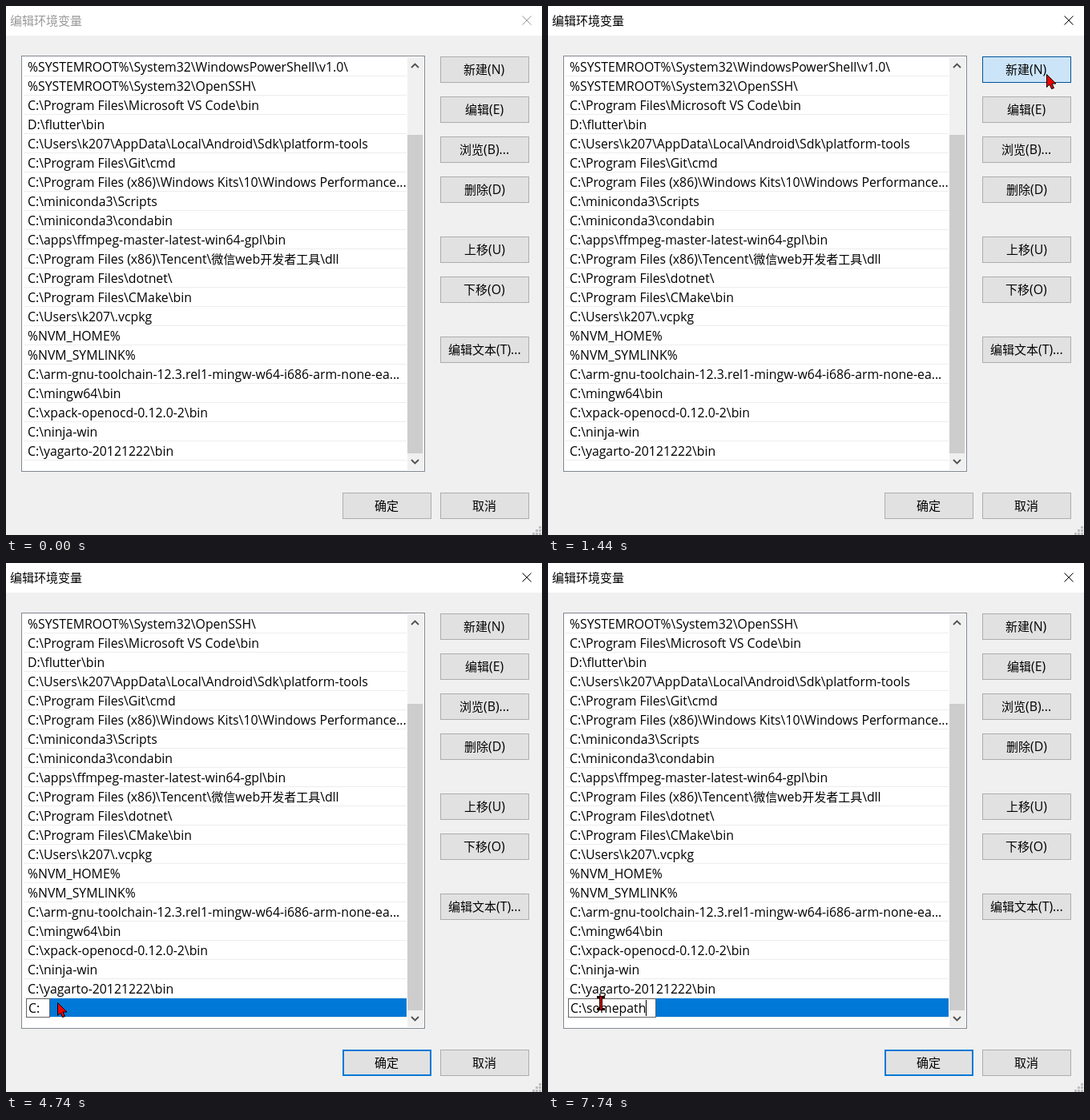
Recreate the animation shown at these times as an HTML page with a canvas. Size 669 px wide and 661 px high, loop 8000 ms.

```html
<!DOCTYPE html>
<html lang="zh">
<head>
<meta charset="utf-8">
<title>编辑环境变量</title>
<style>
html, body { margin: 0; width: 100%; height: 100%; overflow: hidden; background: #f0f0f0; }
canvas { display: block; }
</style>
</head>
<body>
<canvas id="stage" width="669" height="661"></canvas>
<script>
const ctx = document.getElementById('stage').getContext('2d');
const LOOP = 8000, ROW = 24, VISIBLE = 21, BLINK = 480;
const ENTER = 120, PRESS = 1380, ADD = 1620, TYPE = 3360, BURSTS = 6000;

const paths = String.raw`C:\Program Files\Common Files\Oracle\Java\javapath
%SystemRoot%\system32
%SystemRoot%
%SystemRoot%\System32\Wbem
%SYSTEMROOT%\System32\WindowsPowerShell\v1.0\
%SYSTEMROOT%\System32\OpenSSH\
C:\Program Files\Microsoft VS Code\bin
D:\flutter\bin
C:\Users\k207\AppData\Local\Android\Sdk\platform-tools
C:\Program Files\Git\cmd
C:\Program Files (x86)\Windows Kits\10\Windows Performance...
C:\miniconda3\Scripts
C:\miniconda3\condabin
C:\apps\ffmpeg-master-latest-win64-gpl\bin
C:\Program Files (x86)\Tencent\微信web开发者工具\dll
C:\Program Files\dotnet\
C:\Program Files\CMake\bin
C:\Users\k207\.vcpkg
%NVM_HOME%
%NVM_SYMLINK%
C:\arm-gnu-toolchain-12.3.rel1-mingw-w64-i686-arm-none-ea...
C:\mingw64\bin
C:\xpack-openocd-0.12.0-2\bin
C:\ninja-win
C:\yagarto-20121222\bin`.split('\n');

// The side buttons stand 50 apart, with 25 more between groups.
const groups = [['新建(N)', '编辑(E)', '浏览(B)...', '删除(D)'], ['上移(U)', '下移(O)'], ['编辑文本(T)...']];
const buttons = ['确定', '取消'].map((label, i) => ({ label, x: 420 + 122 * i, y: 608 }));
let nextY = 63;
for (const group of groups) {
  for (const label of group) {
    buttons.push({ label, x: 542, y: nextY });
    nextY += 50;
  }
  nextY += 25;
}

// Three slow single keys, then quick pairs.
const typed = 'C:\\somepath';
const keyTimes = [0, 1, 2].map(i => TYPE + 900 * i)
  .concat([6000, 6360, 7320, 7620].flatMap(t => [t, t + 120]));

const moves = [
  { start: ENTER, end: 420, from: [600, 185], to: [390, 228] },
  { start: 1080, end: 1320, from: [390, 228], to: [622, 85] },
  { start: 1740, end: 1980, from: [622, 85], to: [153, 506] },
  { start: 1980, end: 2220, from: [153, 506], to: [64, 549] }
];

const clamp = (v, low, high) => Math.min(high, Math.max(low, v));

function pointerAt(t) {
  const { start, end, from, to } = moves.findLast(m => t >= m.start) || moves[0];
  const k = 1 - (1 - clamp((t - start) / (end - start), 0, 1)) ** 2;
  return from.map((v, i) => Math.round(v + (to[i] - v) * k));
}

// Two wheel notches up, later two down, three rows each.
function topRow(t) {
  const notches = start => clamp(Math.floor((t - start) / 120) + 1, 0, 2);
  const up = Math.max(0, 4 - 3 * notches(480));
  return t >= ADD ? 5 : Math.min(4, up + 3 * notches(960));
}

function rect(x, y, w, h, color) {
  ctx.fillStyle = color;
  ctx.fillRect(x, y, w, h);
}

function frame(x, y, w, h, fill, border, line = 1) {
  rect(x, y, w, h, border);
  rect(x + line, y + line, w - 2 * line, h - 2 * line, fill);
}

function trace(points, color, width) {
  ctx.beginPath();
  points.forEach(([x, y]) => ctx.lineTo(x, y));
  ctx.strokeStyle = color;
  ctx.lineWidth = width;
  ctx.stroke();
}

// Latin and Chinese runs have their own font size; returns the width.
function text(str, x, y, color = '#000', paint = true) {
  let pen = 0;
  ctx.fillStyle = color;
  for (const run of str.match(/[\x00-\xff]+|[^\x00-\xff]+/g) || []) {
    ctx.font = run.charCodeAt(0) < 256
      ? '15.8px "Open Sans", "Noto Sans", sans-serif'
      : '15px "Noto Sans CJK SC", "Noto Sans CJK", sans-serif';
    if (paint) ctx.fillText(run, x + pen, y);
    pen += ctx.measureText(run).width;
  }
  return pen;
}
const widthOf = str => text(str, 0, 0, '#000', false);

function drawTitle(active) {
  const color = active ? '#000' : '#999';
  rect(0, 0, 669, 37, '#fff');
  text('编辑环境变量', 5, 24, color);
  trace([[644.5, 12.5], [655.5, 23.5]], color, 1);
  trace([[655.5, 12.5], [644.5, 23.5]], color, 1);
}

function drawList(t) {
  const top = topRow(t);
  frame(19, 62, 504, 520, '#fff', '#828790');
  ctx.save();
  ctx.beginPath();
  ctx.rect(20, 63, 502, 518);
  ctx.clip();
  for (let i = 0; i <= VISIBLE; i++) {
    rect(22, 87 + i * ROW, 478, 1, '#ededed');
    text(paths[top + i] || '', 27, 82 + i * ROW);
  }
  ctx.restore();
  if (t >= ADD) drawEdit(t);
  drawScrollbar(top, paths.length + (t >= ADD));
}

function drawScrollbar(top, rows) {
  const track = 474;
  rect(501, 64, 20, 516, '#f0f0f0');
  rect(501, Math.round(85 + track * top / rows), 19, Math.round(track * VISIBLE / rows), '#cdcdcd');
  for (const [y, dir] of [[72.5, 1], [571.5, -1]])
    trace([[506, y + 4.5 * dir], [510.5, y], [515, y + 4.5 * dir]], '#505050', 1.8);
}

function drawEdit(t) {
  const count = keyTimes.filter(k => k <= t).length;
  const str = typed.slice(0, count);
  const caret = 28 + Math.round(widthOf(str));
  const right = Math.max(54, caret + 13);
  const idle = t - (count ? keyTimes[count - 1] : ADD);
  rect(25, 544, 475, 23, '#0078d7');
  frame(25, 544, right - 25, 24, '#fff', '#646464');
  text(str, 28, 562);
  if (Math.floor(idle / BLINK) % 2 === 0) rect(caret, 546, 1, 20, '#000');
}

function drawButtons(t) {
  const [px, py] = t >= ENTER ? pointerAt(t) : [0, 0];
  for (const { label, x, y } of buttons) {
    const hover = px >= x && px < x + 111 && py >= y && py < y + 33;
    const pressed = hover && t >= PRESS && t < ADD;
    const isDefault = t >= ADD && label === '确定';
    const fill = pressed ? '#cce4f7' : hover ? '#e5f1fb' : '#e1e1e1';
    const border = pressed ? '#005499' : hover || isDefault ? '#0078d7' : '#adadad';
    frame(x, y, 111, 33, fill, border, isDefault ? 2 : 1);
    text(label, Math.round(x + 55 - widthOf(label) / 2), y + 22);
  }
}

function drawArrow(x, y) {
  ctx.beginPath();
  [[0, 0], [0, 16], [3.5, 12.5], [6, 18], [9, 17], [6.5, 11.5], [11.5, 11.5]]
    .forEach(([dx, dy]) => ctx.lineTo(x + .5 + dx, y + .5 + dy));
  ctx.closePath();
  ctx.fillStyle = '#f00000';
  ctx.fill();
  ctx.strokeStyle = '#000';
  ctx.lineWidth = 1;
  ctx.stroke();
}

function drawBeam(x, y) {
  for (const dy of [0, 15]) rect(x - 5, y + dy, 10, 3, '#200000');
  rect(x - 2, y + 2, 4, 14, '#200000');
  rect(x - 1, y + 1, 2, 16, '#c00000');
}

function draw(now) {
  const t = now % LOOP;
  rect(0, 0, 669, 661, '#f0f0f0');
  drawTitle(t >= PRESS);
  drawList(t);
  drawButtons(t);
  for (let r = 0; r < 3; r++)
    for (let c = 2 - r; c < 3; c++) rect(657 + c * 4, 650 + r * 4, 3, 3, '#bfbfbf');
  // The pointer hides while the path is typed and returns as a text beam.
  if (t >= ENTER && t < keyTimes[2]) drawArrow(...pointerAt(t));
  if (t >= BURSTS) drawBeam(66, 541);
  requestAnimationFrame(draw);
}
requestAnimationFrame(draw);
</script>
</body>
</html>
```
